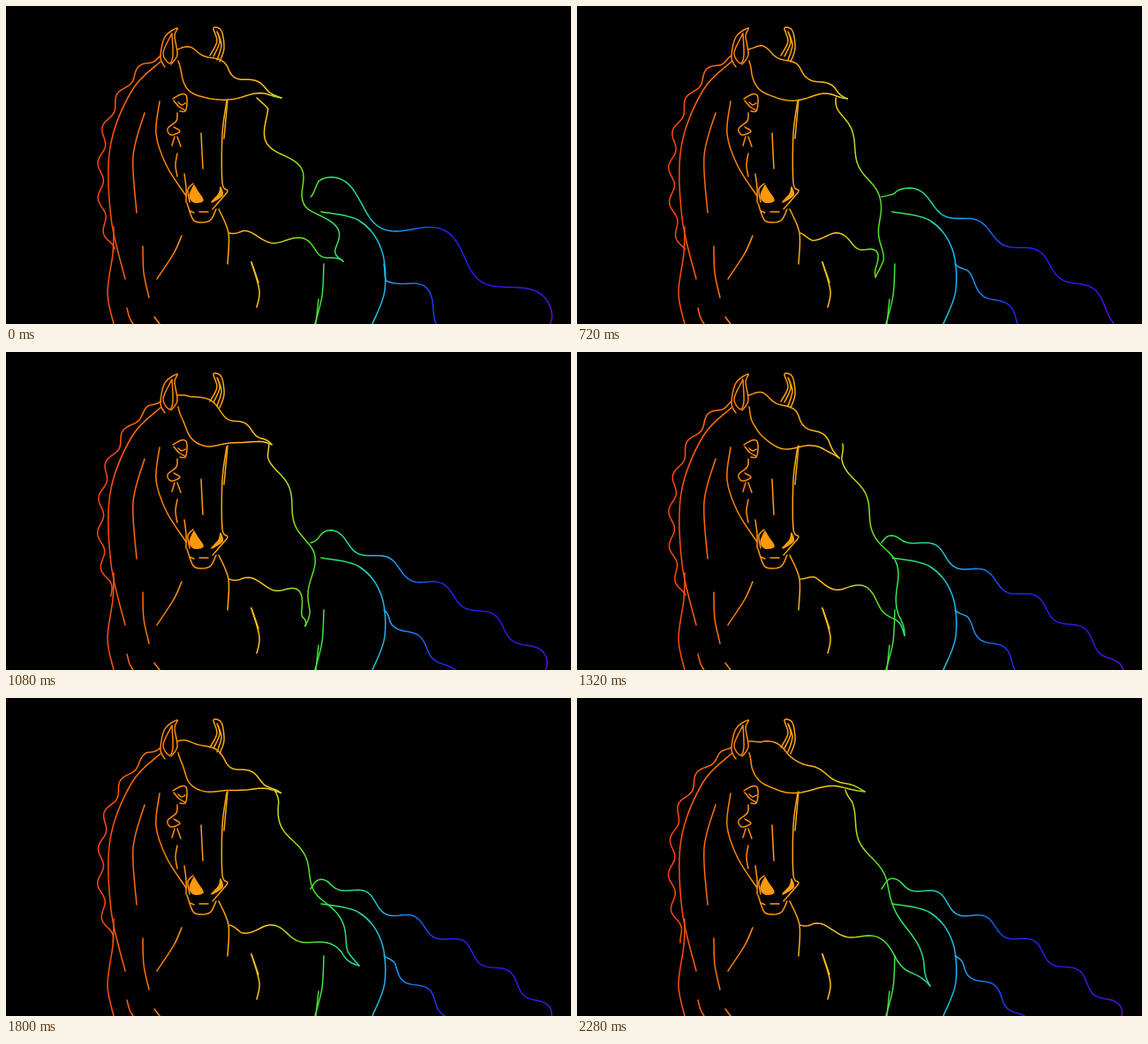
An HTML page that plays this animation: 640 px wide and 360 px high, repeating every 2.4 s.

```html
<!DOCTYPE html>
<html lang="en">
<head>
<meta charset="utf-8">
<title>Rainbow horse</title>
<style>
html, body { margin: 0; width: 100%; height: 100%; overflow: hidden; background: #000; }
svg { display: block; width: 100vw; height: 100vh; }
</style>
</head>
<body>
<svg viewBox="0 0 640 360">
  <defs><linearGradient id="rainbow" gradientUnits="userSpaceOnUse" x1="0" y1="0" x2="640" y2="0"></linearGradient></defs>
  <rect width="640" height="360"/>
  <g id="art" fill="none" stroke="url(#rainbow)" stroke-width="1.5" stroke-linecap="round" stroke-linejoin="round"></g>
</svg>
<script>
const STEP = 120, STEPS = 20, SPACING = 3;
const art = document.getElementById('art');

function add(parent, tag, attrs) {
  const node = document.createElementNS('http://www.w3.org/2000/svg', tag);
  for (const name in attrs) node.setAttribute(name, attrs[name]);
  return parent.appendChild(node);
}

// Smooth curve through "x,y x,y ..." points.
function smooth(text) {
  const p = text.split(' ').map(pair => pair.split(',').map(Number));
  let d = 'M' + p[0];
  for (let i = 0; i < p.length - 1; i++) {
    const a = p[i - 1] || p[i], b = p[i], c = p[i + 1], e = p[i + 2] || c;
    const c1 = b.map((v, j) => v + (c[j] - a[j]) / 6);
    const c2 = c.map((v, j) => v - (e[j] - b[j]) / 6);
    d += `C${c1} ${c2} ${c}`;
  }
  return d;
}

const stops = {
  100: '#ff3c12', 130: '#ff5a0c', 170: '#ff7d0a', 200: '#ff920c', 245: '#ffa60f', 288: '#ffc61a',
  305: '#d8d41c', 322: '#a4dc1e', 345: '#52e028', 365: '#34e858', 400: '#28d4a0',
  430: '#1eb4f4', 460: '#1878f0', 490: '#2028f0', 560: '#3014f0', 630: '#6010d8'
};
for (const x in stops)
  add(document.getElementById('rainbow'), 'stop', { offset: x / 640, 'stop-color': stops[x] });

const body = {
  leftEar: '180,69 175,58 180,35 194,25 191,34 194,55 187,66',
  leftEarInner: '188,31 178,53 185,65 189,56 188,31',
  rightEar: '231,56 239,40 235,25 244,28 247,48 242,63',
  rightEarInner: '235,57 242,41 239,29 244,44 239,61',
  crest: '175,63 143,95 118,160 119,240 135,309',
  shoulder: '122,250 121,280 115,325 122,360',
  neck: '157,121 144,170 148,234',
  cheek: '174,108 170,145 182,181 204,215',
  cheekFold: '194,167 192,180 194,193',
  noseSide: '202,190 204,206 204,222',
  eyeTop: '189,105 198,100 204,101 205,110 203,119 197,119',
  eyeLower: '190,107 196,114 203,118',
  pupil: '195,109 199,112 203,110',
  tear: '194,121 193,130 183,139 187,146 197,142 190,137',
  tearLeft: '191,148 188,158',
  tearRight: '194,148 198,159',
  blaze: '221,144 222,165 223,184',
  noseRight: '250,107 245,145 245,200 251,209 246,216 234,230',
  noseRightInner: '251,106 247,150',
  nostrilRim: '212,201 206,208 208,222',
  chin: '205,223 212,242 222,245 232,242 238,230',
  lipLeft: '208,232 213,234',
  lip: '219,233 229,233',
  chest: '241,230 252,257 251,292',
  foreleg: '199,260 190,280 171,309',
  lowerNeck: '155,272 156,302 162,330',
  leg: '137,342 140,353 144,360',
  legFold: '168,352 174,360',
  breast: '278,290 287,322 284,341',
  breastFold: '278,290 286,313',
  flank: '360,292 358,328 350,360',
  flankFold: '354,332 351,360',
  rump: '357,233 400,243 425,275 429,322 415,360'
};
for (const name in body) add(art, 'path', { d: smooth(body[name]) });

for (const nostril of ['213,203 208,215 213,222 223,220 217,210 213,203', '243,205 241,213 233,222 245,214 243,205'])
  add(art, 'path', { d: smooth(nostril), fill: '#ff980c' });

// Positions of the free ends, reached at the given steps.
const tipSteps = [0, 3, 8, 11, 13, 17, 19, STEPS];
const forelockTip = '312,104 311,117 303,97 297,120 309,122 314,93 326,106 312,104';
const maneTip = '382,289 361,310 323,305 371,321 397,310 403,296 400,326 382,289';

function tipAt(track, step) {
  const points = track.split(' ').map(pair => pair.split(',').map(Number));
  const i = tipSteps.findLastIndex(key => key <= step);
  const mix = (step - tipSteps[i]) / (tipSteps[i + 1] - tipSteps[i]);
  return points[i].map((v, j) => v + (points[i + 1][j] - v) * mix);
}

// A wave runs along each base curve: crest position = start + speed * step.
const strands = [
  { base: '175,56 147,76 125,108 112,140 107,190 110,240 120,276', amp: -3.5, length: 40, start: 146, speed: 7.5 },
  { base: '194,49 212,48 230,57 246,67 258,78 280,88 310,108', amp: 3, length: 48, start: 6, speed: 9, tip: forelockTip },
  { base: '195,62 200,80 208,95 222,104 240,107 282,102 310,108', amp: 1.5, length: 60, start: 0, speed: 9, tip: forelockTip },
  { base: '300,104 307,130 328,175 345,212 362,245 378,308', amp: 5, length: 84, start: 8, speed: 5, swell: 1, sway: 20, tip: maneTip },
  { base: '253,257 280,262 312,265 348,280 378,308', amp: 6, length: 63, start: 82, speed: -6.5, tip: maneTip },
  { base: '345,216 365,207 400,222 440,243 520,283 600,340 614,364', amp: 6, length: 60, start: 31, speed: 14.7, swell: 1.4, stretch: 70 },
  { base: '428,292 450,314 480,337 506,364', amp: 5, length: 55, start: -117, speed: 12, swell: 1.4, stretch: 30 }
];

for (const strand of strands) {
  const path = strand.path = add(art, 'path', { d: smooth(strand.base) });
  const total = strand.total = path.getTotalLength();
  const count = Math.round(total / SPACING);
  strand.points = Array.from({ length: count + 1 }, (_, i) => {
    const arc = total * i / count;
    const p = path.getPointAtLength(arc);
    const a = path.getPointAtLength(arc - 1), b = path.getPointAtLength(arc + 1);
    const dx = b.x - a.x, dy = b.y - a.y, size = Math.hypot(dx, dy);
    return { arc, x: p.x, y: p.y, nx: dy / size, ny: -dx / size };
  });
}

function strandPath({ points, total, amp, length, start, speed, swell = 0, stretch = 0, sway = 0, tip }, step) {
  const height = amp * (1 + swell * Math.exp(-step / 2));
  const waveLength = length + stretch * Math.exp(-step / 4);
  const crest = start + speed * step;
  const end = points[points.length - 1];
  const [tipX, tipY] = tip ? tipAt(tip, step) : [end.x, end.y];
  const rootShift = sway * (Math.min(step / 13, 1) - 0.8);
  return 'M' + points.map(({ arc, x, y, nx, ny }) => {
    const u = arc / total, pull = u ** 3;
    const fade = Math.min(1, arc / 15, tip ? (total - arc) / 20 : 1);
    const wave = height * fade * Math.cos(2 * Math.PI * (arc - crest) / waveLength);
    const px = x + nx * wave + (tipX - end.x) * pull + rootShift * (1 - u);
    const py = y + ny * wave + (tipY - end.y) * pull;
    return px.toFixed(2) + ',' + py.toFixed(2);
  }).join('L');
}

function render(ms) {
  const step = Math.floor(ms / STEP) % STEPS;
  for (const strand of strands) strand.path.setAttribute('d', strandPath(strand, step));
}

const origin = performance.now();
function tick() {
  render(performance.now() - origin);
  requestAnimationFrame(tick);
}
tick();
</script>
</body>
</html>
```
